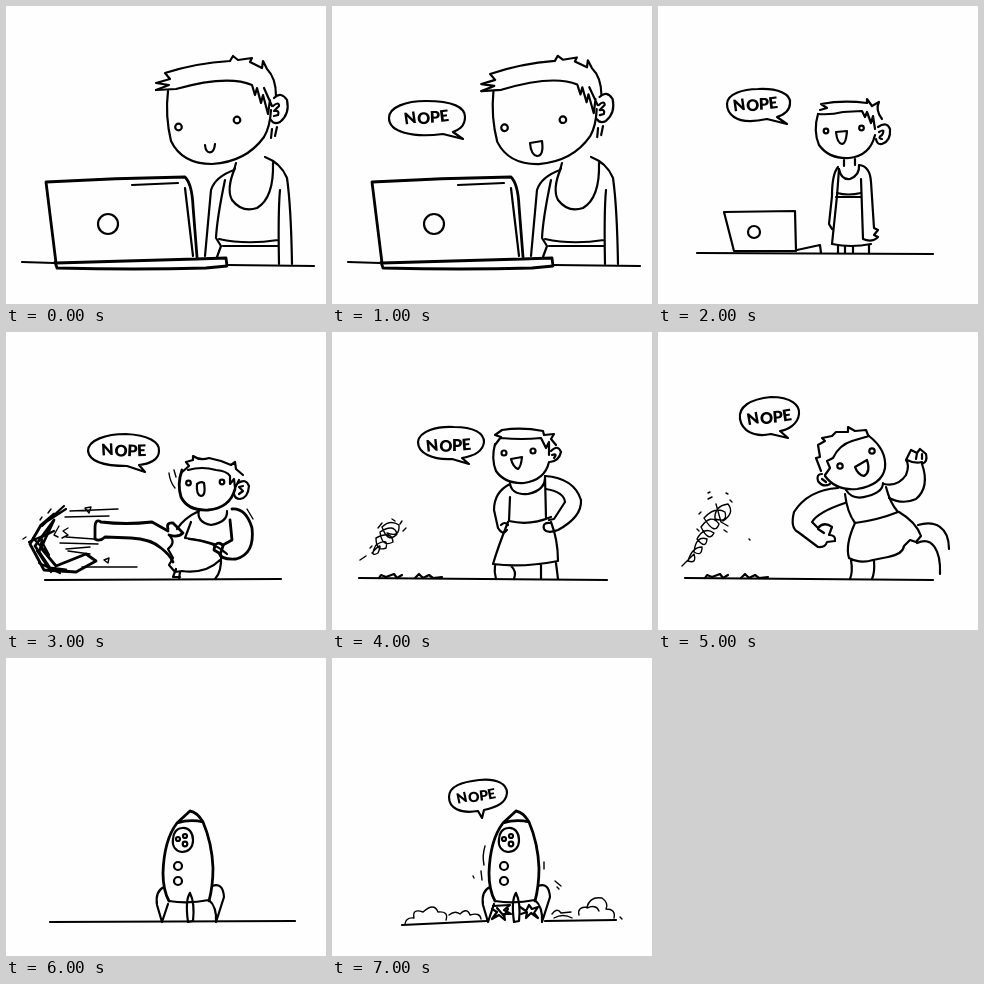
Write an HTML page that moves like this. It is 320 by 298 pixels and loops after 8 s.

```html
<!DOCTYPE html>
<html lang="en">
<head>
<meta charset="utf-8">
<title>Nope</title>
<style>
  html, body { margin: 0; width: 100%; height: 100%; overflow: hidden; background: #fefefe; }
  svg { display: block; width: 100%; height: 100%; }
  path, circle { fill: none; stroke: #000; stroke-width: 2.2; stroke-linecap: round; stroke-linejoin: round; }
  .fine { stroke-width: 1.4; }
  .bold { stroke-width: 2.8; }
  text { font: 900 16px Lato, "Open Sans", sans-serif; text-anchor: middle; }
  .scene { visibility: hidden; animation: show 8s step-end infinite; animation-delay: calc(var(--at) * 1s); }
  .long { animation-name: show2; }
  @keyframes show { 0% { visibility: visible; } 12.5%, 100% { visibility: hidden; } }
  @keyframes show2 { 0% { visibility: visible; } 25%, 100% { visibility: hidden; } }
</style>
</head>
<body>
<svg viewBox="0 0 320 298">
  <defs>
    <g id="head">
      <path d="M162 85Q159 110 165 135Q176 158 206 158Q240 156 258 131Q264 121 265 104"/>
      <path d="M150 84L163 79L150 77L164 73L159 67Q190 57 224 55L227 50L232 54L246 52L244 56L256 62L257 55L261 63Q270 72 270 90"/>
      <path d="M150 84L170 83C195 76 225 70 246 79L249 89L251 82L255 97L257 89L262 108L264 94M258 82L266 100"/>
      <path d="M268 92Q275 85 281 94Q284 108 274 116Q268 119 265 114M267 100Q273 95 273 100L268 105Q274 104 272 109L268 110"/>
      <path d="M266 123L265 132M271 121L269 130"/>
      <circle cx="172.500" cy="121" r="3.300"/><circle cx="231" cy="114" r="3.300"/>
    </g>
    <g id="rocket">
      <path class="bold" d="M171 165L184 153Q191 154 197 164Q184 161 171 165Q158 182 157 215Q157 232 163 243M197 164Q206 185 207 210Q207 228 203 243"/>
      <path d="M163 243Q182 246 203 242"/>
      <path d="M176 170C183 169 187 175 187 182C187 190 182 194 176 194C169 193 166 188 167 181C167 175 171 170 176 170"/>
      <circle cx="172" cy="208" r="4"/><circle cx="172" cy="223" r="4"/>
      <path d="M158 229Q149 233 151 247L156 264L162 246M206 228Q217 224 218 239L210 264Q211 249 203 242M184 235Q179 242 182 264L187 263Q189 245 184 235"/>
      <circle cx="172" cy="181" r="2"/><circle cx="179" cy="178" r="2"/><circle cx="179" cy="186" r="2.300"/>
    </g>
    <g id="rubble">
      <path d="M27 246L275 248"/>
      <path d="M47 246L49 243L54 245L62 242L65 246L70 243M83 246L87 242L91 246L97 243L101 246L110 245"/>
    </g>
  </defs>

  <!-- at the laptop -->
  <g class="scene long" style="--at:0">
    <path d="M16 256L48 257M222 259L308 260"/>
    <path class="bold" d="M50 257L40 176Q110 172 179 171Q186 178 187 200L191 251M49 256L51 262Q130 264 200 262L221 260L220 252L190 253L50 257"/>
    <path d="M126 179L172 177M179 182L187 250"/>
    <circle cx="102" cy="218" r="10"/>
    <path d="M230 157L228 164Q209 171 205 184L199 250M219 174Q211 212 210 232L215 240L211 251"/>
    <path d="M229 162Q220 183 226 194Q236 207 251 202Q268 192 267 157"/>
    <path d="M259 151Q275 157 281 172Q285 200 286 258M274 184Q272 205 273 258M213 233Q240 239 272 234M217 240L271 240"/>
  </g>
  <g class="scene" style="--at:0">
    <use href="#head"/>
    <path d="M199 139C200 149 208 149 209 138"/>
  </g>
  <g class="scene" style="--at:1">
    <use href="#head" transform="rotate(-1 215 120)"/>
    <path d="M198 137L210 135Q212 150 205 150Q199 149 198 137"/>
    <path d="M57 112C57 101 74 95 94 95C120 95 133 101 133 111C133 121 126 124 121 126L131 133L111 128C80 132 57 126 57 112"/>
    <text transform="translate(95 117) rotate(-4)" rotate="-4 6 2 -3">NOPE</text>
  </g>

  <!-- standing up -->
  <g class="scene" style="--at:2">
    <path d="M39 247L275 248"/>
    <path d="M66 206L137 205L138 245L76 245ZM139 244L162 239L163 247"/>
    <circle cx="96" cy="226" r="6"/>
    <path d="M69 98C69 88 85 83 100 83C120 82 133 88 132 97C132 105 125 109 119 111L129 118L109 113Q86 118 76 111Q69 106 69 98"/>
    <text transform="translate(98 104) rotate(-4)" rotate="-4 6 2 -3">NOPE</text>
    <path d="M160 108Q155 125 161 139Q171 153 191 152Q212 150 217 129"/>
    <path d="M160 108Q173 109 185 106L204 105L207 111L209 106L213 117L215 110L217 123M162 104L169 102L163 98Q185 94 209 97L209 93L214 100L221 96Q217 104 224 113"/>
    <path d="M220 121Q229 115 232 123Q233 135 224 138Q219 139 218 133M221 126Q228 122 224 129Q219 132 224 133"/>
    <circle cx="168" cy="125" r="2.300"/><circle cx="203.500" cy="122" r="2.300"/>
    <path d="M178 126L189 125Q188 138 184 138Q179 137 178 126"/>
    <path d="M186 154V160M197 153V159M180 161Q174 168 174 190L171 218L174 223M181 163L179 190L174 238Q193 242 213 238"/>
    <path d="M181 163Q183 174 192 173Q202 169 201 159Q212 160 213 176L216 222L220 224L216 229L220 231Q214 237 205 233L203 173"/>
    <path d="M179 187Q190 190 203 187M178 191L203 191M180 240V247M187 240V247M195 240V247M211 239V247"/>
  </g>

  <!-- kick -->
  <g class="scene" style="--at:3">
    <path d="M39 248L275 247"/>
    <path d="M82 119C82 108 100 102 120 102C142 103 154 110 153 119C153 128 143 132 133 133L139 140L121 134Q84 134 82 119"/>
    <text transform="translate(118 124) rotate(1)" rotate="-4 5 2 -3">NOPE</text>
    <path class="bold" d="M176 138Q171 152 175 165Q182 179 202 178Q224 176 229 157"/>
    <path d="M175 141L183 134L180 130L187 128L187 124Q194 129 203 126L215 129L225 133L229 130L230 137L237 143M182 138Q196 134 210 138Q221 139 224 144L224 152L228 147L229 156L233 148"/>
    <path d="M232 151Q240 146 243 154Q242 166 234 167Q229 167 228 162M237 154L233 155L237 159L233 162"/>
    <circle cx="182.500" cy="151" r="2.300"/><circle cx="216" cy="150" r="2.300"/>
    <path d="M191 152Q195 149 198 151Q200 164 195 164Q190 163 191 152"/>
    <path class="fine" d="M163 141Q164 150 169 156M168 138L170 145M241 177L247 187"/>
    <path d="M193 178Q190 190 205 193Q222 190 221 179M193 179Q178 186 171 197M185 190L179 206Q196 208 208 212"/>
    <path class="bold" d="M226 177Q240 176 246 196Q249 222 230 227Q215 228 213 221L208 218L209 213Q214 209 217 214L215 220M224 188L226 208L217 213"/>
    <path class="bold" d="M162 197Q160 190 167 191L177 201Q172 206 163 203M162 199L146 190Q120 193 95 190Q89 186 89 196L89 207Q94 210 99 205L125 206Q145 207 155 216Q164 223 167 230"/>
    <path d="M164 204Q170 211 162 217L167 226L163 233L169 240L176 239Q200 242 214 228M183 207Q207 209 221 222M170 237L167 245L174 245M174 240L173 247M215 222Q216 240 209 247"/>
    <path class="bold" d="M48 182L35 193L24 212L38 238L70 240L90 229L80 222L50 234L35 216L48 188L29 214L44 236L60 238"/>
    <path d="M60 177L40 190M23 210L48 199L34 206L43 223L27 206M36 194L58 174M36 207L33 222M33 231L54 241M31 219L45 240"/>
    <path class="fine" d="M64 179L112 177M59 185L103 184M54 211L92 212M60 217L84 215M76 235L131 235M60 205L88 207M62 219L84 222M79 176L85 175L83 181ZM98 228L103 226L102 231ZM53 194L48 203L52 205M62 196L57 199L62 203L56 206M17 207L20 205M34 188L36 185M42 181L45 177"/>
  </g>

  <!-- proud -->
  <g class="scene" style="--at:4">
    <use href="#rubble"/>
    <path d="M86 110C87 99 105 94 122 95C142 95 152 101 152 110C151 119 142 124 130 126L137 132L120 127C100 128 86 121 86 110"/>
    <text transform="translate(117 119) rotate(-2)" rotate="-4 6 2 -3">NOPE</text>
    <path class="fine" d="M28 228L34 224M40 221Q52 207 46 221Q37 226 44 213Q57 205 54 216Q44 220 44 206Q60 198 61 210Q50 216 48 200Q62 191 65 202Q56 212 50 195Q58 187 67 193Q68 206 55 201M46 196L50 191M71 199L74 196M70 189L68 192M38 216L40 214M60 187L63 189"/>
    <path d="M163 112Q159 127 164 139Q173 152 192 151Q213 148 217 130"/>
    <path d="M163 113L169 105L163 103L170 98Q190 95 211 99L212 103L222 102L219 107L224 113M169 106Q190 108 209 106L214 116L217 110L217 123"/>
    <path d="M219 119Q226 112 229 120Q227 129 218 130M220 123Q226 121 222 126"/>
    <circle cx="172" cy="121" r="2.500"/><circle cx="201" cy="119" r="2.500"/>
    <path d="M179 127L190 125Q189 135 186 137Q181 135 179 127"/>
    <path d="M178 151Q179 163 196 162Q214 158 213 144L214 186M178 152Q162 160 162 178L166 196Q171 204 175 198M178 165L177 189Q198 194 219 185M169 193Q173 189 176 193"/>
    <path d="M213 144Q242 146 249 168Q250 185 226 198Q215 202 212 197Q210 190 219 191M214 157Q232 160 233 170L222 187L217 188"/>
    <path d="M176 190Q166 215 161 232Q190 236 226 229Q226 208 219 190M163 233Q162 240 164 247M179 234Q185 239 182 247M209 233V247M224 231L226 247"/>
  </g>

  <!-- running off -->
  <g class="scene" style="--at:5">
    <use href="#rubble"/>
    <path d="M82 87C80 75 92 67 113 65C133 65 142 73 141 82C140 92 130 98 122 99L130 106L113 102C95 106 84 98 82 87"/>
    <text transform="translate(112 91) rotate(-6)" rotate="-4 6 2 -3">NOPE</text>
    <path class="fine" d="M24 234L36 222Q39 232 30 229Q34 215 44 215Q44 225 36 220Q38 203 49 207Q48 218 39 207Q46 194 56 201Q51 211 43 195Q53 181 61 192Q57 204 46 186Q57 174 67 180Q70 191 57 187Q56 174 70 172Q77 181 65 189M58 172L63 190L70 194M41 182L43 180M50 167L54 165M50 161L52 160M68 161L70 162M74 170L72 168M66 198L69 200M91 207L92 208M39 197L41 199"/>
    <path d="M167 144Q178 159 199 157Q224 153 227 136Q229 118 211 104"/>
    <path d="M163 139L158 126L162 125L160 113L167 109L164 106L174 104L178 100L190 100L190 95L197 99L208 98L210 103M167 143L172 136L169 129L175 126Q181 113 194 109L211 104"/>
    <path d="M164 142Q158 142 160 149Q165 156 172 152M164 147L168 150"/>
    <circle cx="182" cy="134" r="2.700"/><circle cx="214" cy="119" r="2.700"/>
    <path d="M197 135L209 128Q213 140 206 144Q200 143 197 135"/>
    <path d="M180 156Q150 158 136 180Q132 196 140 200L160 215Q167 216 169 210L177 209Q178 203 171 203L174 195Q166 189 160 196L154 190Q160 180 187 171M160 197L166 201"/>
    <path d="M226 152Q240 155 248 143Q252 133 248 128L253 118L259 121L262 117L268 122Q270 130 264 132Q272 155 258 167Q245 173 231 166M249 128Q257 132 264 130M259 121L258 127M264 122L264 127"/>
    <path d="M188 158Q195 169 210 164Q225 160 225 151M187 162Q189 180 197 191Q220 188 240 180Q232 171 228 155"/>
    <path d="M197 191Q187 213 191 226Q202 232 215 228L230 225Q245 222 246 214L252 208L258 210L263 204Q258 190 241 180M193 228Q195 240 192 247M216 229Q217 240 214 247M260 193C277 188 291 195 291 217M259 211C274 204 283 218 282 242"/>
  </g>

  <!-- rocket -->
  <g class="scene" style="--at:6">
    <use href="#rocket"/>
    <path d="M44 264L289 263"/>
  </g>
  <g class="scene" style="--at:7">
    <use href="#rocket"/>
    <path d="M117 139C117 128 130 124 147 122C165 120 175 126 175 135C174 145 165 149 152 152L150 160L146 153C128 156 117 150 117 139"/>
    <text transform="translate(145 143) rotate(-8)" rotate="-4 6 2 -3" style="font-size:14px">NOPE</text>
    <path d="M161 248L178 247L172 252L179 256L172 256L173 262L167 257L160 261L165 254L160 251M165 250L172 258L176 251M188 249L194 253L197 247L200 251L206 249L202 255L206 260L199 255L194 260L195 254L189 256"/>
    <path d="M70 267L155 263M213 263L284 262"/>
    <path class="fine" d="M73 266Q74 259 82 260Q80 250 91 254Q102 244 106 254Q117 253 114 262M117 257Q123 252 128 256Q135 249 138 257Q148 254 149 261M220 256Q225 249 229 255L239 254M222 260Q231 255 240 260M247 257Q245 249 255 249Q258 238 270 240Q277 245 274 251Q284 251 282 260M255 250Q264 246 267 253M288 259L290 261"/>
    <path class="fine" d="M153 188Q150 198 152 207M149 213L150 222M141 218L142 220M212 204V211M223 223L229 228M227 231L225 229"/>
  </g>
</svg>
</body>
</html>
```
